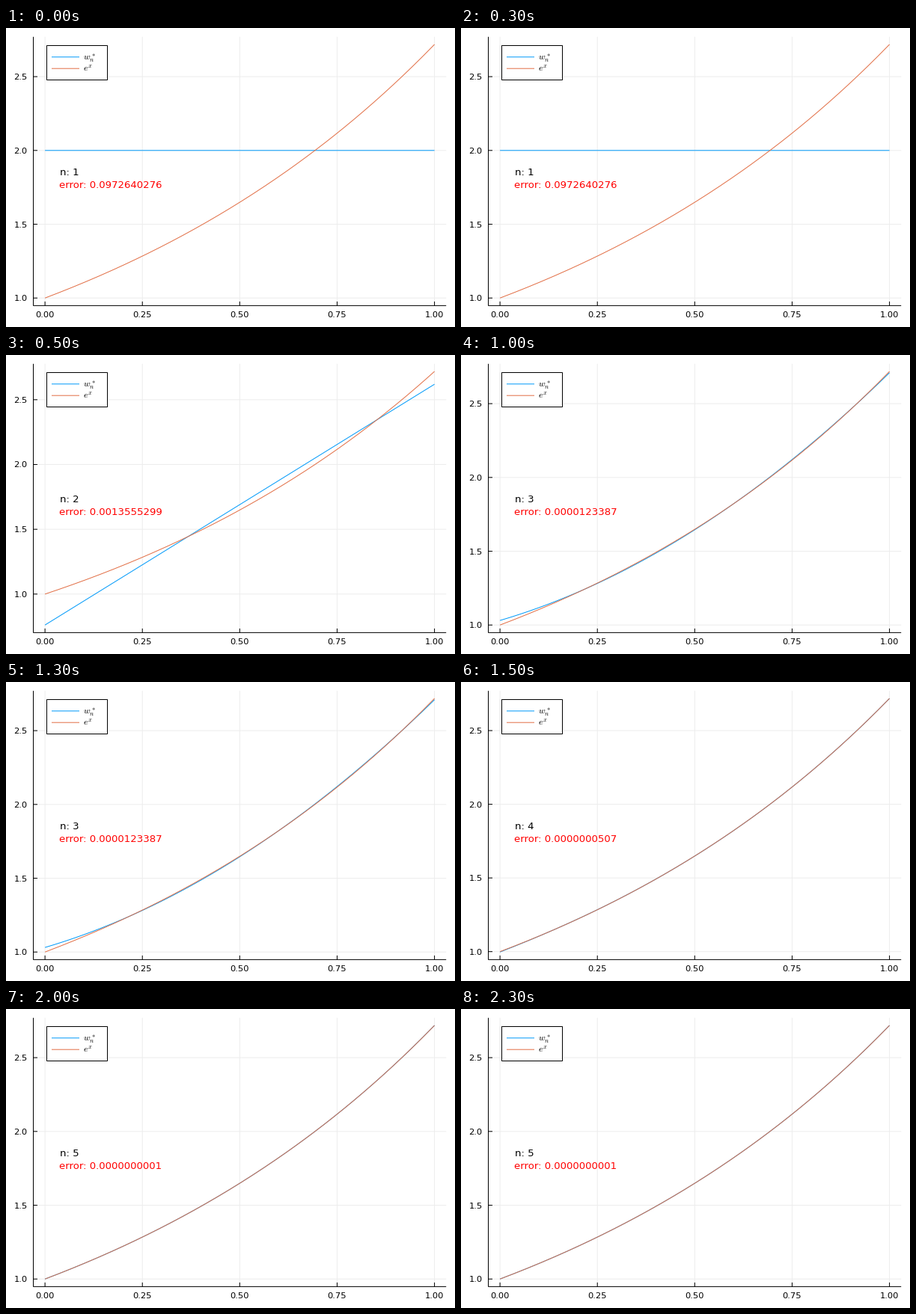
A matplotlib script that plays this animation: 600 px wide and 400 px high, repeating every 2500 ms.

```python
import numpy as np
import matplotlib.pyplot as plt
from matplotlib.animation import FuncAnimation
from matplotlib.patches import Rectangle

W, H, DPI = 600, 400, 100
LEFT, RIGHT, TOP, BOTTOM = 36.5, 588.2, 11.8, 371.4
PAD = 0.03  # margin on each side, as a share of the data span
BLUE, ORANGE = "#009afa", "#e26f46"
GRID = "#ededed"
Y_TICKS = (1.0, 1.5, 2.0, 2.5)
# Squared errors from a coarse quadrature, so not exactly the analytic values
ERRORS = (0.0972640276, 0.0013555299, 0.0000123387, 0.0000000507, 0.0000000001)

fig = plt.figure(figsize=(W / DPI, H / DPI), dpi=DPI, facecolor="white")
ax = fig.add_axes([0, 0, 1, 1])
ax.set_xlim(0, W)
ax.set_ylim(H, 0)
ax.axis("off")


def line(xs, ys, color, z):
    return ax.plot(xs, ys, color=color, lw=0.72, zorder=z, snap=False,
                   solid_capstyle="butt", solid_joinstyle="miter")[0]


def label(x, y, text, px, **style):
    return ax.text(x, y, text, fontsize=px * 72 / DPI, va="baseline",
                   zorder=6, **style)


def x_pixel(x):
    span = (RIGHT - LEFT) / (1 + 2 * PAD)
    return LEFT + span * (x + PAD)


def y_pixel(y, low, high):
    span = (BOTTOM - TOP) / (1 + 2 * PAD)
    return BOTTOM - span * ((y - low) / (high - low) + PAD)


def best_fit(n):
    """Least squares polynomial with n terms for exp on [0, 1], weight x."""
    moments = [1.0]
    for k in range(2, n + 1):
        moments.append(np.e - k * moments[-1])
    i = np.arange(n)
    gram = 1 / (i[:, None] + i + 2)
    return np.linalg.solve(gram, moments)


# Fixed frame, vertical grid and x labels
for x in (0, 0.25, 0.5, 0.75, 1):
    px = x_pixel(x)
    line([px, px], [TOP, BOTTOM], GRID, 1)
    line([px, px], [BOTTOM, BOTTOM - 5.5], "black", 4)
    label(px, 387, f"{x:.2f}", 11.5, ha="center")
line([LEFT, LEFT, RIGHT], [TOP, BOTTOM, BOTTOM], "black", 4)

# Parts that follow the y scale
grid_lines = [line([LEFT, RIGHT], [0, 0], GRID, 1) for _ in Y_TICKS]
tick_marks = [line([LEFT, LEFT + 5.5], [0, 0], "black", 4) for _ in Y_TICKS]
tick_labels = [label(28.7, 0, f"{y:.1f}", 11.5, ha="right") for y in Y_TICKS]

xs = np.linspace(0, 1, 201)
exp_ys = np.exp(xs)
fit_line = line(x_pixel(xs), xs, BLUE, 2)
exp_line = line(x_pixel(xs), xs, ORANGE, 3)

# Legend
ax.add_patch(Rectangle((54.5, 23.5), 81, 46, fc="white", ec="black",
                       lw=0.72, zorder=5, snap=False))
for y, color, name in ((38.8, BLUE, r"$w_n^{\,*}$"), (54.2, ORANGE, "$e^x$")):
    line([61, 98], [y, y], color, 6)
    label(103, y + 4, name, 12, math_fontfamily="cm")

n_text = label(72, 197, "", 13.3)
error_text = label(71, 214, "", 13.3, color="red")


def draw(frame):
    n = frame + 1
    fit_ys = np.polyval(best_fit(n)[::-1], xs)
    both = np.concatenate([fit_ys, exp_ys])
    low, high = both.min(), both.max()

    fit_line.set_ydata(y_pixel(fit_ys, low, high))
    exp_line.set_ydata(y_pixel(exp_ys, low, high))
    for y, grid, mark, text in zip(Y_TICKS, grid_lines, tick_marks, tick_labels):
        py = y_pixel(y, low, high)
        grid.set_ydata([py, py])
        mark.set_ydata([py, py])
        text.set_y(py + 4)

    n_text.set_text(f"n: {n}")
    error_text.set_text(f"error: {ERRORS[frame]:.10f}")
    return []


anim = FuncAnimation(fig, draw, frames=5, interval=500, repeat=True,
                     repeat_delay=0, blit=False)
plt.show()
```
